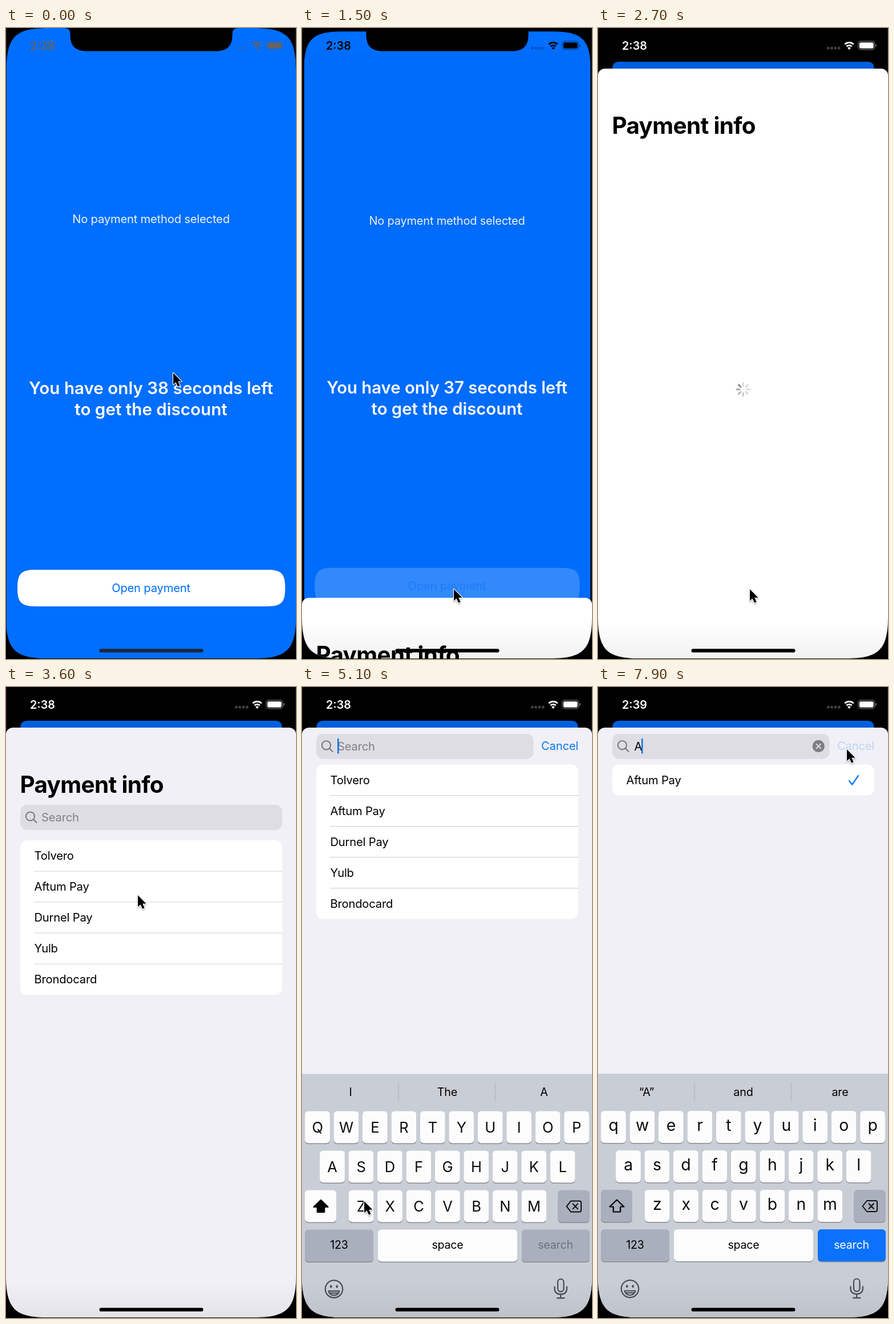
An HTML page that plays this animation: 508x1103 px, repeating every 8000 ms.

```html
<!DOCTYPE html>
<html lang="en">
<head>
<meta charset="utf-8">
<title>Payment sheet</title>
<style>
  html, body { margin: 0; width: 100%; height: 100%; overflow: hidden; background: #000; }
  svg { display: block; width: 508px; height: 1103px; font-family: Inter, Roboto, sans-serif; }
  text { letter-spacing: -.01em; white-space: pre; }
  .mid { text-anchor: middle; }
  .bold { font-weight: 700; letter-spacing: -.016em; }
  .semi, .semi text { font-weight: 600; letter-spacing: 0; }
</style>
</head>
<body>
<svg id="stage" viewBox="0 0 508 1103" xmlns="http://www.w3.org/2000/svg"></svg>
<script>
const LOOP = 8000, STEP = 100, BLUE = '#006eff', LINK = '#0a78f0';
const METHODS = ['Tolvero', 'Aftum Pay', 'Durnel Pay', 'Yulb', 'Brondocard'];

const text = (x, y, size, str, attrs = '') =>
  `<text x="${x}" y="${y}" font-size="${size}" ${attrs}>${str}</text>`;
const mid = (x, y, size, str, attrs = '') => text(x, y, size, str, `class="mid" ${attrs}`);
const rect = (x, y, w, h, r, fill, attrs = '') =>
  `<rect x="${x}" y="${y}" width="${w}" height="${h}" rx="${r}" fill="${fill}" ${attrs}/>`;
const group = (id, body, attrs = '') => `<g id="${id}" ${attrs}>${body}</g>`;
const line = (d, width, color, attrs = '') =>
  `<path d="${d}" fill="none" stroke="${color}" stroke-width="${width}" stroke-linecap="round" stroke-linejoin="round" ${attrs}/>`;

// Rounded box with continuous-curvature corners.
function squircle(x, y, w, h, r) {
  const e = 1.45 * r, c = e - .3 * r, W = w - 2 * e, H = h - 2 * e;
  return `M${x + e} ${y}h${W}c${c} 0 ${e} ${e - c} ${e} ${e}v${H}c0 ${c} ${c - e} ${e} ${-e} ${e}` +
    `h${-W}c${-c} 0 ${-e} ${c - e} ${-e} ${-e}v${-H}c0 ${-c} ${e - c} ${-e} ${e} ${-e}z`;
}

const home = () => group('home',
  rect(1, 0, 507, 1103, 0, BLUE) +
  mid(254, 341, 20.2, 'No payment method selected', 'fill="#fff" fill-opacity=".93"') +
  `<g fill="#fff" class="semi">
    <text id="left" class="mid" x="254" y="639.5" font-size="29.6"></text>
    ${mid(254, 676.5, 29.6, 'to get the discount')}</g>` +
  group('open', `<path d="${squircle(20, 947, 469, 64, 22)}" fill="#fff"/>` +
    mid(254, 986, 20.2, 'Open payment', `id="openText" fill="${BLUE}"`)),
  'clip-path="url(#card)"');

const rows = names => rect(25, 0, 459, names.length * 54, 12, '#fff') + names.map((name, i) =>
  (i ? `<path d="M49 ${i * 54}H484" stroke="#d2d2d6" stroke-width="1.2"/>` : '') +
  text(49.5, i * 54 + 34.3, 20.2, name)).join('');

const spinner = () => group('spinner', Array.from({ length: 8 }, (_, i) =>
  `<path d="M0 -6.3V-11.2" stroke-width="3.1" stroke-linecap="round" transform="rotate(${i * 45})"/>`).join(''),
  'transform="translate(254.3 631.7)"');

const search = () => group('search',
  `<rect id="bar" x="25" y="0" height="44" rx="12" fill="#dedde3"/>` +
  '<circle cx="42.5" cy="20" r="7.6" fill="none" stroke="#77777c" stroke-width="2"/>' +
  line('M48.2 25.7L53.5 31', 2.2, '#77777c') +
  text(62, 29.3, 20.2, 'Search', 'id="hint" fill="#807f85"') +
  text(63.5, 29.3, 20.2, 'A', 'id="typed"') +
  group('clear', '<circle cx="386.3" cy="21.7" r="10.6" fill="#7d7d82"/>' +
    line('M382.5 17.9l7.6 7.6m0-7.6l-7.6 7.6', 2, '#dedde3')) +
  '<rect id="caret" y="8" width="2.6" height="27" rx="1.2" fill="#1273e8"/>' +
  text(419, 28.4, 20.2, 'Cancel', `id="cancel" fill="${LINK}"`));

const key = (x, y, w, fill, id = '') =>
  rect(x, y + 1.6, w, 56, 6, '#8a8c91') + rect(x, y, w, 56, 6, fill, id && `id="${id}"`);

function letters(upper) {
  return ['qwertyuiop', 'asdfghjkl', 'zxcvbnm'].map((row, r) => [...row].map((c, i) =>
    mid([27, 53, 103.6][r] + i * 50.45, 741 + r * 69 + (upper ? 37.6 : 35.4), upper ? 25.5 : 28.4,
      upper ? c.toUpperCase() : c, 'fill="#0c0c0d"')).join('')).join('');
}

function keyboard() {
  const caps = [[10, 5.1], [9, 31.1], [7, 81.7]].map(([n, x], r) =>
    Array.from({ length: n }, (_, i) => key(x + i * 50.45, 741 + r * 69, 43.8, '#fcfcfd')).join('')).join('');
  const words = (id, list) => group(id, list.map((w, i) => mid(85 + i * 169.5, 714.5, 19.8, w)).join(''));
  const arrow = 'M33 896.5L45.5 908.5H39.2V917.5H26.8V908.5H20.5Z';
  return group('keys',
    rect(0, 676, 508, 430, 0, '#c9cdd5') +
    line('M169 692V723M338.5 692V723', 1.2, '#b0b4bc') + caps +
    key(5, 879, 55, '#fcfcfd', 'shift') + key(448.5, 879, 55, '#a9afbd') +
    key(5, 948, 120, '#a9afbd') + key(133, 948, 244, '#fcfcfd') + key(385, 948, 119, '#a9afbd', 'go') +
    line(arrow, 2.2, '#000', 'id="arrow"') +
    line('M471 898H486Q489 898 489 901V914Q489 917 486 917H471L463.5 907.5ZM474.5 903l8.5 9m0-9l-8.5 9', 2, '#111') +
    mid(65, 982, 19.6, '123') + mid(255, 981.5, 19.6, 'space') +
    mid(444, 981.5, 19.6, 'search', 'id="goText"') +
    group('upper', letters(true)) + group('lower', letters(false)) +
    words('wordsA', ['I', 'The', 'A']) + words('wordsB', ['“A”', 'and', 'are']) +
    '<g fill="none" stroke="#4b4e54" stroke-width="2.2" stroke-linecap="round" stroke-linejoin="round">' +
    '<circle cx="56" cy="1052" r="15.2"/><path d="M46.5 1055.5H65.5Q63.5 1063 56 1063T46.5 1055.5ZM49 1059H63"/>' +
    '<rect x="448" y="1034.5" width="10.5" height="22" rx="5.2"/>' +
    '<path d="M442.5 1048v3q0 10 10.7 10t10.7-10v-3M453.2 1061v6.5M447 1067.8h12.5"/></g>' +
    '<g fill="#4b4e54"><ellipse cx="50.8" cy="1047.5" rx="1.8" ry="2.6"/><ellipse cx="61.2" cy="1047.5" rx="1.8" ry="2.6"/></g>');
}

const sheet = () => group('sheet',
  '<rect id="paper" y="71" width="508" height="1100" rx="12"/>' +
  text(24.5, 185, 40.4, 'Payment info', 'id="title" class="bold"') + spinner() +
  group('content', group('list', group('all', rows(METHODS)) +
    group('found', rows([METHODS[1]]) + '<rect id="tap" x="25" width="459" height="54" rx="12" fill="#000" fill-opacity=".18"/>' +
      line('M440 28.5L445.3 35L456 19.5', 2.3, LINK, 'id="check"'))) + search()));

const status = () => group('status',
  '<text id="clock" class="semi" x="42" y="37.6" font-size="19.8"></text>' +
  [0, 1, 2, 3].map(i => rect(401 + i * 6.3, 32.8, 4.6, 4.8, 1.6, 'currentColor', 'opacity=".25"')).join('') +
  line('M432.3 28.4a11.2 11.2 0 0 1 15.4 0M435.4 32.3a6.6 6.6 0 0 1 9.2 0', 2.8, 'currentColor', 'style="stroke-linecap:butt"') +
  '<path d="M440 38l-3-3.3q3-2.6 6 0z"/>' +
  '<rect x="455.8" y="23.2" width="29" height="14.6" rx="4.4" fill="none" stroke="currentColor" stroke-width="1.2" opacity=".45"/>' +
  rect(457.8, 25.2, 25, 10.6, 2.8, 'currentColor') +
  '<path d="M486.3 28v5q1.7-.7 1.7-2.5t-1.7-2.5z" opacity=".5"/>', 'fill="currentColor"');

document.getElementById('stage').innerHTML = `
  <defs>
    <clipPath id="screen"><path d="${squircle(0, 0, 508, 1102, 51)}"/></clipPath>
    <clipPath id="card"><path id="cardShape"/></clipPath>
    <linearGradient id="shade" x1="0" y1="0" x2="0" y2="1">
      <stop offset="0" stop-opacity="0"/><stop offset="1" stop-opacity=".055"/></linearGradient>
    <filter id="soft" x="-50%" y="-50%" width="200%" height="200%">
      <feDropShadow dx="0" dy="1.5" stdDeviation="1.5" flood-opacity=".35"/></filter>
  </defs>
  <rect width="508" height="1103"/>
  <rect x=".5" y="-60" width="507" height="1162" rx="57" fill="none" stroke="#222226"/>
  <g clip-path="url(#screen)">
    ${home()}
    <rect id="dim" y="40" width="508" height="1063"/>
    ${sheet()}${keyboard()}
    <rect id="floor" y="1040" width="508" height="62" fill="url(#shade)"/>
  </g>
  <path d="M103 0Q112.5 0 112.5 10V14Q113 40.4 141 40.4H368Q396 40.4 396.5 14V10Q396.5 0 406 0Z"/>
  ${status()}
  <rect id="pill" x="163.5" y="1085.3" width="182" height="6.2" rx="3.1"/>
  <g id="cursor" filter="url(#soft)">
    <path transform="translate(1 2) scale(.9)" d="M0 0V22.5L5 18L9 26.5L13 24.7L9.2 16.4H16.2Z" stroke="#fff" stroke-width="2.4" stroke-linejoin="round" paint-order="stroke"/>
  </g>`;

const el = {};
document.querySelectorAll('[id]').forEach(e => el[e.id] = e);
const set = (id, attrs) => { for (const k in attrs) el[id].setAttribute(k, attrs[k]); };
const show = (id, on) => { el[id].style.display = on ? '' : 'none'; };
const clamp = v => Math.max(0, Math.min(1, v));
const mix = (a, b, p) => a + (b - a) * p;

// Critically damped spring from 0 to 1.
function spring(t, start, rate = 15.1) {
  const x = Math.max(0, t - start) / 1000 * rate;
  return 1 - (1 + x) * Math.exp(-x);
}

// Pointer stops: time, x, y.
const PATH = [[0, 292, 601], [300, 292, 601], [1200, 265, 979], [2800, 265, 979], [3500, 230, 362],
  [3800, 230, 362], [4300, 150, 222], [4500, 150, 222], [5000, 108, 897], [5100, 108, 897], [5400, 48, 836],
  [5800, 48, 836], [6400, 182, 212], [6500, 182, 212], [6800, 178, 164], [7100, 178, 164], [7600, 435, 107], [LOOP, 435, 107]];

function pointer(t) {
  const i = PATH.findIndex(p => p[0] > t);
  const [a, x, y] = PATH[i - 1], [b, u, v] = PATH[i];
  const p = (t - a) / (b - a), e = p * p * (3 - 2 * p);
  return [mix(x, u, e), mix(y, v, e)];
}

function draw(t) {
  const rise = spring(t, 1464), focus = spring(t, 4480);
  const loaded = t >= 3300, typed = t >= 5700, pressed = t >= 1400;

  // Home screen shrinks into a card behind the sheet.
  const scale = 1 - .095 * rise;
  set('home', { transform: `translate(${254.5 * (1 - scale)} ${58.8 * rise}) scale(${scale})` });
  set('cardShape', { d: squircle(1, 0, 507, 1200, mix(51, 11, rise) / scale) });
  set('dim', { opacity: .135 * rise });
  el.left.textContent = `You have only ${t < 700 ? 38 : 37} seconds left`;
  set('open', { opacity: pressed ? .2 : 1 });
  set('openText', { opacity: pressed ? .45 : 1 });

  set('sheet', { transform: `translate(0 ${1032 * (1 - rise)})` });
  set('paper', { fill: loaded ? '#f1f0f6' : '#fff' });
  set('title', { transform: `translate(0 ${-124 * focus})`, opacity: clamp(1 - 2 * focus) });
  show('spinner', !loaded);
  const lead = Math.floor((t - 1800) / 125);
  [...el.spinner.children].forEach((spoke, i) => {
    const age = ((lead - i) % 8 + 8) % 8;
    spoke.setAttribute('stroke', ['#8f8f8f', '#a9a9a9', '#b8b8b8', '#cbcbcb'][age] || '#dadada');
  });

  show('content', loaded);
  set('list', { transform: `translate(0 ${mix(268, 135.5, focus)})` });
  set('search', { transform: `translate(0 ${mix(206, 81.7, focus)})` });
  set('bar', { width: mix(459, 380.5, focus) });
  show('all', !typed);
  show('found', typed);
  show('tap', t >= 6900 && t < 7100);
  show('check', t >= 7000);
  show('hint', !typed);
  show('typed', typed);
  show('clear', typed);
  set('caret', { x: typed ? 76 : 62 });
  show('caret', t >= 4700 && (t - (typed ? 5800 : 4700) + 1000) % 1000 < 500);
  set('cancel', { opacity: t >= 7800 ? .22 : clamp(focus * 2 - 1) });

  set('keys', { transform: `translate(0 ${427 * (1 - focus)})` });
  show('keys', focus > 0);
  show('upper', !typed);
  show('lower', typed);
  show('wordsA', !typed);
  show('wordsB', typed);
  set('shift', { fill: typed ? '#a9afbd' : '#fcfcfd' });
  set('arrow', { fill: typed ? 'none' : '#000' });
  set('go', { fill: typed ? '#0a72ff' : '#a9afbd' });
  set('goText', { fill: typed ? '#fff' : '#6d727d' });
  show('floor', rise > 0);

  const grey = t < 200 ? 100 * (1 - t / 200) : 255 * clamp((t - 1500) / 390);
  el.status.style.color = `rgb(${grey},${grey},${grey})`;
  el.clock.textContent = t < 5300 ? '2:38' : '2:39';
  set('pill', { fill: t < 200 ? '#1d2636' : '#000' });
  set('cursor', { transform: `translate(${pointer(t)})` });
}

function tick() {
  const t = performance.now() % LOOP;
  draw(Math.floor(t / STEP) * STEP);
  requestAnimationFrame(tick);
}
tick();
</script>
</body>
</html>
```
